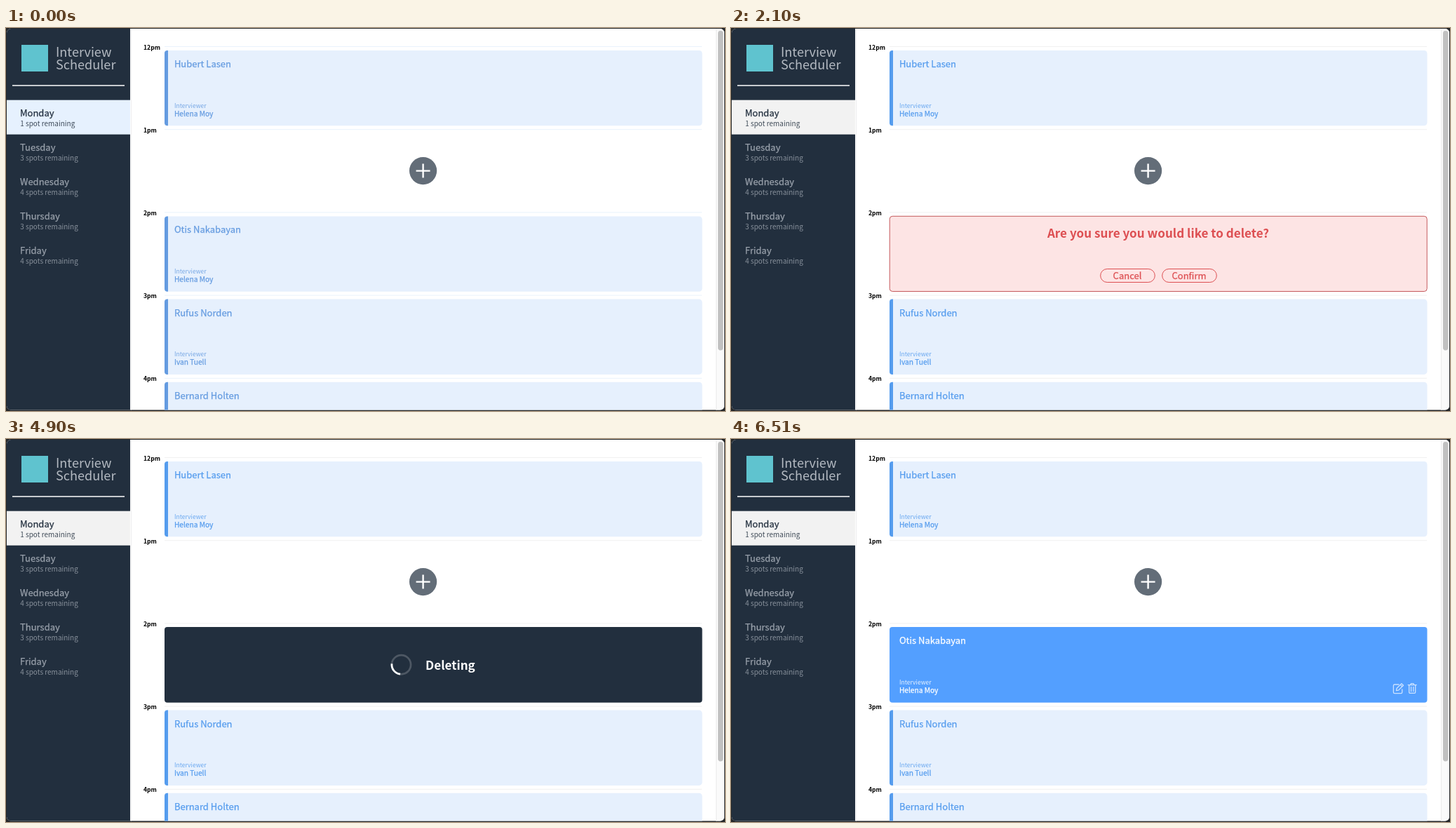
Animation of 1025x546 px, one loop 6580 ms. Source, as an HTML page:

```html
<!DOCTYPE html>
<html lang="en">
<head>
<meta charset="utf-8">
<title>Interview Scheduler</title>
<style>
  html, body { margin: 0; height: 100%; overflow: hidden; background: #242628; }
  svg { display: block; width: 100vw; height: 100vh;
    font-family: "Noto Sans CJK JP", "Noto Sans CJK SC", "Noto Sans CJK", "Noto Sans", sans-serif;
    --blue: #559cee; --pale: #e6f0fd; --day: #f2f2f2; --line: #f0f0f1; }
  svg.cool { --blue: #649be0; --day: #e6f1fe; --line: #e9f2fc; }
  text { fill: currentColor; }
  .name, .who { stroke: currentColor; stroke-width: .25; }
  .name { font-size: 13px; }
  .who { font-size: 10.2px; }
  .small { font-size: 10px; font-weight: 300; opacity: .85; }
  .tiny { font-size: 8.6px; font-weight: 300; opacity: .85; }
  .head { font-size: 17.1px; font-weight: 700; }
  .hour { font-size: 8.6px; font-weight: 700; }
  .brand { font-size: 18.1px; font-weight: 200; color: #b4bac2; }
  .mid { text-anchor: middle; }
  .icon { fill: none; stroke: #fff; stroke-width: 1.3; stroke-linejoin: round; stroke-linecap: round; }
  #confirm { color: #dd4f52; }
  #deleting { color: #fff; }
  #error { color: #f99b42; }
</style>
</head>
<body>
<svg id="stage" viewBox="0 0 1025 546">
  <clipPath id="window"><rect x="1" y="1" width="1023" height="543.4" rx="6"/></clipPath>
  <g clip-path="url(#window)">
    <rect width="1025" height="546" fill="#fff"/>
    <rect width="177" height="546" fill="#222f3e"/>
    <path d="M178.5 1V546" stroke="#ececee"/>
    <rect x="22" y="24" width="38" height="38" fill="#5fc3cf"/>
    <text class="brand" x="71" y="41">Interview</text>
    <text class="brand" x="71" y="59">Scheduler</text>
    <path d="M9 82H169" stroke="#fff" stroke-width="1.6"/>
    <rect y="102.7" width="177" height="49" fill="var(--day)"/>
    <g id="days"></g>
    <g id="hours"></g>
    <circle cx="594.6" cy="203.6" r="19.6" fill="#636d78"/>
    <path d="M584.6 203.6H604.6M594.6 193.6V213.6" stroke="#fff" stroke-width="2.4"/>

    <g id="shown"></g>

    <g id="hover">
      <rect x="226" y="268" width="766.5" height="107.7" rx="4" fill="#539fff"/>
      <g id="booking"></g>
      <path class="icon" opacity=".7" d="M952 350H946a1.6 1.6 0 0 0-1.6 1.6V361a1.6 1.6 0 0 0 1.6 1.6H955.2a1.6 1.6 0 0 0 1.6-1.6V357M949 355.5l6.9-6.9 2.6 2.6-6.9 6.9-3.1.5zM954.2 350.3l2.6 2.6"/>
      <path class="icon" id="trash" d="M965.2 350.6H977.2M968.6 350.4l1-1.8h3.2l1 1.8M966.7 351V361a1.4 1.4 0 0 0 1.4 1.4h6.2a1.4 1.4 0 0 0 1.4-1.4V351M969.6 353.5V359.8M972.8 353.5V359.8"/>
    </g>

    <g id="confirm">
      <rect x="226.2" y="268.3" width="766" height="107.2" rx="4" fill="#fde4e4" stroke="#c4585b"/>
      <text class="head mid" x="609" y="299">Are you sure you would like to delete?</text>
      <rect x="526.7" y="343.5" width="77.6" height="19" rx="9.5" fill="none" stroke="#dd4f52"/>
      <rect id="pill" x="614.7" y="343.5" width="77.6" height="19" rx="9.5" stroke="#dd4f52"/>
      <text class="name mid" x="565" y="357.6">Cancel</text>
      <text class="name mid" id="pillText" x="653" y="357.6">Confirm</text>
    </g>

    <g id="deleting">
      <rect x="226" y="268" width="766.5" height="107.7" rx="4" fill="#222f3e"/>
      <g fill="none" stroke="#fff" stroke-width="2.7">
        <circle cx="563.5" cy="321.7" r="13.6" opacity=".2"/>
        <path id="arc" d="M553.9 312.1A13.6 13.6 0 0 0 553.9 331.3"/>
      </g>
      <text class="head" x="598" y="329">Deleting</text>
    </g>

    <g id="error">
      <rect x="226.2" y="268.3" width="766" height="107.2" rx="4" fill="#fdf0e0" stroke="#cba878"/>
      <text class="head" x="241" y="322.6">Error</text>
      <text class="small" x="241" y="337.4">Could not cancel appointment</text>
      <path id="close" d="M963 282l13.2 13.2M976.2 282l-13.2 13.2" stroke="#f99b42" stroke-width="2.4"/>
    </g>

    <rect x="1012" width="13" height="546" fill="#fafafa"/>
    <path d="M1012.5 0V546" stroke="#ebebeb"/>
    <rect x="1015" y="4" width="7.4" height="455.5" rx="3.7" fill="#c1c1c1"/>
  </g>
</svg>
<script>
const $ = id => document.getElementById(id);
const PITCH = 118.2;
const text = (cls, x, y, color, str) =>
  `<text class="${cls}" x="${x}" y="${y}" style="color:${color}">${str}</text>`;

const labels = (slot, name, host, color) => {
  const y = 32 + slot * PITCH;
  return text('name', 239.9, y + 24, color, name) +
    text('tiny', 239.9, y + 81.6, color, 'Interviewer') +
    text('who', 239.9, y + 93.7, color, host);
};

const card = (slot, name, host) => {
  const y = 32 + slot * PITCH;
  return `<rect x="226" y="${y}" width="766.5" height="107.3" rx="4.5" fill="var(--pale)"/>
    <path d="M231 ${y}h-1a4 4 0 0 0-4 4v99.3a4 4 0 0 0 4 4h1z" fill="var(--blue)"/>` +
    labels(slot, name, host, 'var(--blue)');
};

const days = [['Monday', '1 spot'], ['Tuesday', '3 spots'], ['Wednesday', '4 spots'],
  ['Thursday', '3 spots'], ['Friday', '4 spots']];
$('days').innerHTML = days.map(([day, spots], i) => {
  const color = i ? '#99a1ab' : '#222f3e';
  return text('name', 20, 125.8 + 49 * i, color, day) +
    text('small', 20.2, 139.6 + 49 * i, color, spots + ' remaining');
}).join('');

const booked = [2, 'Otis Nakabayan', 'Helena Moy'];
$('hours').innerHTML = ['12pm', '1pm', '2pm', '3pm', '4pm'].map((hour, i) => {
  const y = 26.5 + i * PITCH;
  return `<path d="M226 ${y}H992" stroke="var(--line)"/>` +
    text('hour', 196, y + 4, '#000', hour);
}).join('') + card(0, 'Hubert Lasen', 'Helena Moy') +
  card(3, 'Rufus Norden', 'Ivan Tuell') + card(4, 'Bernard Holten', 'Ivan Tuell');
$('shown').innerHTML = card(...booked);
$('booking').innerHTML = labels(...booked, '#fff');

const steps = [[0, 'shown'], [280, 'hover'], [2100, 'confirm'], [3920, 'deleting'],
  [5110, 'error'], [6510, 'hover']];
const fade = (t, from, to) => .7 + .3 * Math.min(1, Math.max(0, (t - from) / (to - from)));

function draw(now) {
  const t = now % 6580;
  const view = steps.filter(([start]) => t >= start).pop()[1];
  for (const [, id] of steps) $(id).style.display = id === view ? '' : 'none';
  $('stage').classList.toggle('cool', t < 280);
  $('trash').style.opacity = t < 6510 ? fade(t, 1120, 1470) : .7;
  const hot = t >= 2870;
  $('pill').style.fill = hot ? '#ee5253' : 'none';
  $('pillText').style.color = hot ? '#fff' : '';
  $('arc').setAttribute('transform', `rotate(${(t - 3920) / 1100 * 360} 563.5 321.7)`);
  $('close').style.opacity = fade(t, 5950, 6160);
  requestAnimationFrame(draw);
}
requestAnimationFrame(draw);
</script>
</body>
</html>
```
